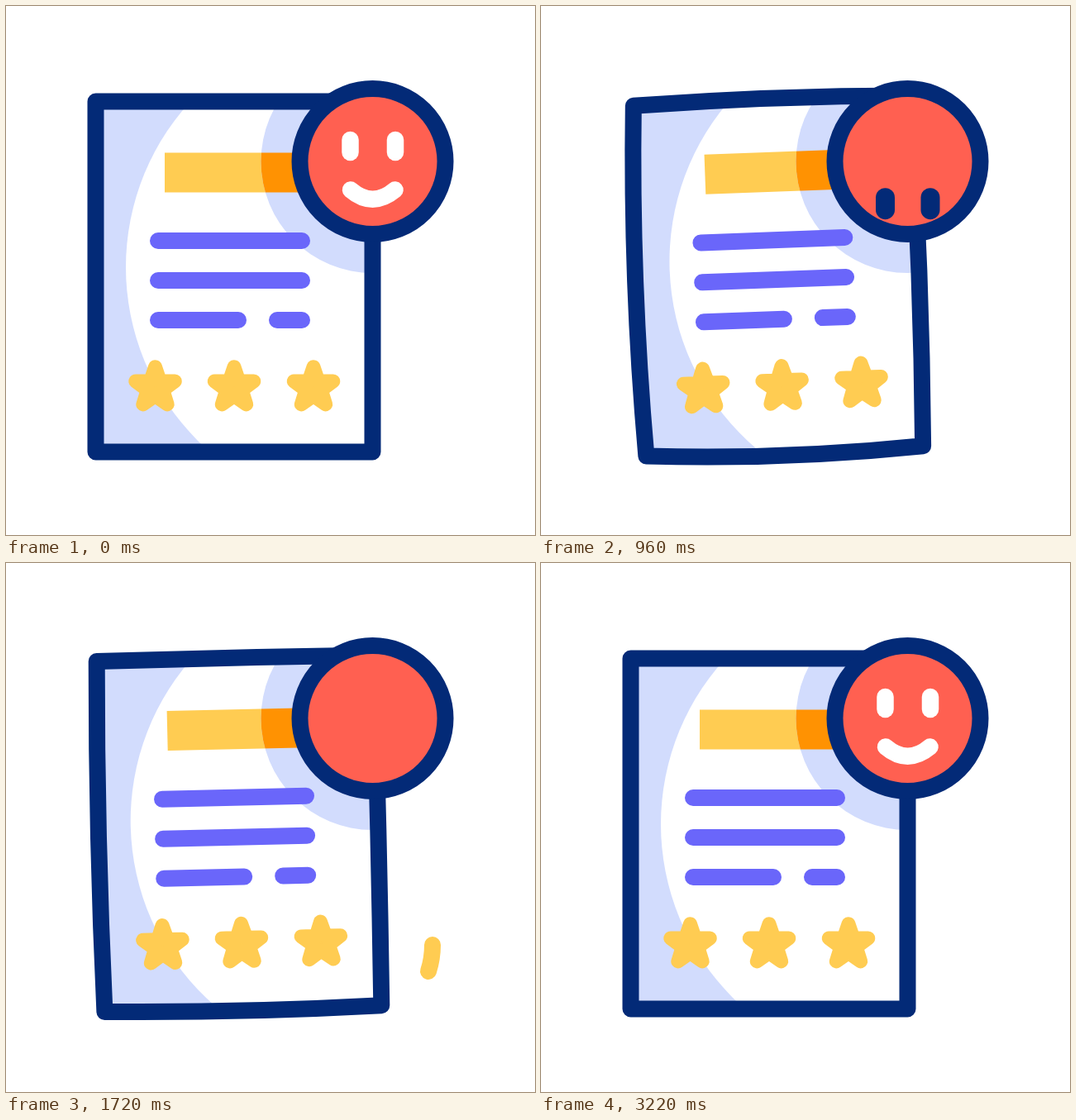
Animation, 640 px wide and 640 px high, one loop 3280 ms. Source, as an HTML page with a canvas:

```html
<!DOCTYPE html>
<html lang="en">
<head>
<meta charset="utf-8">
<title>Review sheet</title>
<style>
  html, body { margin: 0; width: 100%; height: 100%; overflow: hidden; background: #fff; }
  canvas { display: block; width: 640px; height: 640px; }
</style>
</head>
<body>
<canvas id="stage"></canvas>
<script>
const LOOP = 3280;
const NAVY = '#032a77', YELLOW = '#ffcc52', ORANGE = '#ff9202',
      PURPLE = '#6a66fa', RED = '#ff6051', PALE = '#d2dcfd', WHITE = '#fff';

const canvas = document.getElementById('stage');
const ctx = canvas.getContext('2d');
const dpr = window.devicePixelRatio || 1;
canvas.width = canvas.height = 640 * dpr;

const clamp = p => Math.min(1, Math.max(0, p));
const ease = p => p < .5 ? 2 * p * p : 1 - 2 * (1 - p) * (1 - p);
const ramp = (t, from, to) => ease(clamp((t - from) / (to - from)));

// time, dx, dy, degrees, inward bend of top/right, inward bend of bottom/left
const SWING = [
  [240, 0, 0, 0, 0, 0],
  [400, -2.5, -15, .6, 3.5, 1.5],
  [560, -6, -28.5, 1.4, 8.5, 4],
  [600, -6, -29.3, 1.45, 8, 4],
  [780, 3, -13, -.6, 2, -1],
  [960, 11, -1, -2.1, -3, -5.5],
  [1140, 2.5, -14, -.3, 1, 0],
  [1310, -7.5, -27.5, 1.75, 6, 3],
  [1380, -9, -23, 2.1, 6, 2.5],
  [1500, -6.3, -11, 1.25, 4.5, 0],
  [1680, 4, -1, -.9, 0, -2],
  [1840, 10, -1, -2.1, -2.5, -4],
  [1960, 5.5, -.3, -1.3, -.8, -1.8],
  [2120, 1.5, 0, -.35, 0, -.5],
  [2300, 0, 0, 0, 0, 0]
];

// Smooth curve through the rows
function swingAt(t) {
  const last = SWING.length - 1;
  if (t <= SWING[0][0] || t >= SWING[last][0]) return [0, 0, 0, 0, 0];
  const i = SWING.findIndex(row => row[0] > t) - 1;
  const a = SWING[i], b = SWING[i + 1], span = b[0] - a[0], u = (t - a[0]) / span;
  const slope = (k, c) => k === 0 || k === last ? 0 :
    (SWING[k + 1][c] - SWING[k - 1][c]) / (SWING[k + 1][0] - SWING[k - 1][0]) * span;
  return [1, 2, 3, 4, 5].map(c => {
    const d = b[c] - a[c], m = slope(i, c), n = slope(i + 1, c);
    return a[c] + m * u + (3 * d - 2 * m - n) * u * u + (m + n - 2 * d) * u * u * u;
  });
}

function local(draw) {
  ctx.save();
  draw();
  ctx.restore();
}

function disc(x, y, r, color) {
  ctx.beginPath();
  ctx.arc(x, y, r, 0, Math.PI * 2);
  ctx.fillStyle = color;
  ctx.fill();
}

function stroke(color, width, path) {
  ctx.strokeStyle = color;
  ctx.lineWidth = width;
  ctx.stroke(path);
}

function line(x1, y1, x2, y2, color, width = 20) {
  const p = new Path2D();
  p.moveTo(x1, y1);
  p.lineTo(x2, y2);
  stroke(color, width, p);
}

function sheetPath(tr, bl) {
  const p = new Path2D();
  p.moveTo(108.5, 115.5);
  p.quadraticCurveTo(276, 115.5 + 2 * tr, 443.5, 115.5);
  p.quadraticCurveTo(443.5 - 2 * tr, 328, 443.5, 539.5);
  p.quadraticCurveTo(276, 539.5 - 2 * bl, 108.5, 539.5);
  p.quadraticCurveTo(108.5 + 2 * bl, 328, 108.5, 115.5);
  p.closePath();
  return p;
}

const starPath = new Path2D();
for (let i = 0; i < 10; i++) {
  const r = i % 2 ? 9.8 : 25, a = (i * 36 - 90) * Math.PI / 180;
  starPath.lineTo(r * Math.cos(a), r * Math.sin(a));
}
starPath.closePath();

function star(x, t, start) {
  const pop = ramp(t, start, start + 200) - ramp(t, start + 200, start + 600);
  local(() => {
    ctx.translate(x, 461.7);
    ctx.scale(1 + .2 * pop, 1 + .2 * pop);
    ctx.fillStyle = YELLOW;
    ctx.fill(starPath);
    stroke(YELLOW, 17, starPath);
  });
}

function sheet(t) {
  const [dx, dy, deg, tr, bl] = swingAt(t);
  const path = sheetPath(tr, bl);
  const pose = () => {
    ctx.translate(276 + dx, 328 + dy);
    ctx.rotate(deg * Math.PI / 180);
    ctx.translate(-276, -328);
  };
  const bar = color => {
    ctx.fillStyle = color;
    ctx.fillRect(192, 177.5, 170, 48);
  };

  local(() => {
    const still = ctx.getTransform();
    pose();
    ctx.clip(path);
    ctx.fillStyle = PALE;
    ctx.fill(path);
    disc(441.5, 316, 296.5, WHITE);
    bar(YELLOW);
    // The badge halo stays put while the sheet moves
    ctx.setTransform(still);
    disc(443.5, 188, 135, PALE);
    ctx.clip();
    pose();
    bar(ORANGE);
  });

  local(() => {
    pose();
    // Part of the bar outside the halo is already painted
    line(184, 284, 358, 284, PURPLE);
    line(184, 332, 358, 332, PURPLE);
    line(184, 380, 281, 380, PURPLE);
    line(328, 380, 358, 380, PURPLE);
    star(180.5, t, 2280);
    star(276, t, 2040);
    star(372, t, 1800);
    stroke(NAVY, 20, path);
  });
}

function face(drop, color, width, mouthY, bendY) {
  if (drop >= 130) return;
  local(() => {
    ctx.translate(0, drop);
    line(416.5, 162, 416.5, 177, color, width);
    line(471, 162, 471, 177, color, width);
    const mouth = new Path2D();
    mouth.moveTo(417, mouthY);
    mouth.quadraticCurveTo(443.5, bendY, 470.5, mouthY);
    stroke(color, width, mouth);
  });
}

function badge(t) {
  disc(443.5, 188, 88, RED);
  local(() => {
    ctx.beginPath();
    ctx.arc(443.5, 188, 80, 0, Math.PI * 2);
    ctx.clip();
    face(130 * (ramp(t, 470, 690) - ramp(t, 1660, 1880)), WHITE, 20.5, 222.5, 245);
    face(130 * (1 - ramp(t, 855, 1075) + ramp(t, 1378, 1598)), NAVY, 23, 232, 209);
  });
  const ring = new Path2D();
  ring.arc(443.5, 188, 88, 0, Math.PI * 2);
  stroke(NAVY, 20, ring);
}

// Arc that draws itself on, then runs out at its tail
function sweep(t, start, x, y, from, to) {
  const head = ramp(t, start, start + 220), tail = ramp(t, start + 200, start + 400);
  if (head <= tail) return;
  const angle = p => (from + (to - from) * p) * Math.PI / 180;
  const p = new Path2D();
  p.arc(x, y, 105, angle(tail), angle(head), to < from);
  stroke(YELLOW, 20, p);
}

function burst(t) {
  const head = ramp(t, 2770, 3040), tail = ramp(t, 2930, 3200);
  if (head <= tail) return;
  const ray = (x1, y1, x2, y2) => {
    const x = p => x1 + (x2 - x1) * p, y = p => y1 + (y2 - y1) * p;
    line(x(tail), y(tail), x(head), y(head), YELLOW);
    line(554 - x(tail), y(tail), 554 - x(head), y(head), YELLOW);
  };
  ray(74, 401, 42, 375);
  ray(72, 426, 21, 426);
  ray(74, 451, 42, 477);
}

function frame(now) {
  const t = now % LOOP;
  ctx.setTransform(dpr, 0, 0, dpr, 0, 0);
  ctx.fillStyle = WHITE;
  ctx.fillRect(0, 0, 640, 640);
  ctx.lineCap = ctx.lineJoin = 'round';
  sheet(t);
  sweep(t, 340, 151, 431, 180, 62);
  sweep(t, 1660, 411, 462, 0, 115);
  burst(t);
  badge(t);
  requestAnimationFrame(frame);
}

const begin = performance.now();
requestAnimationFrame(() => frame(0));
function frameClock() { return performance.now() - begin; }
const draw = frame;
frame = () => draw(Math.max(0, frameClock()));
</script>
</body>
</html>
```
